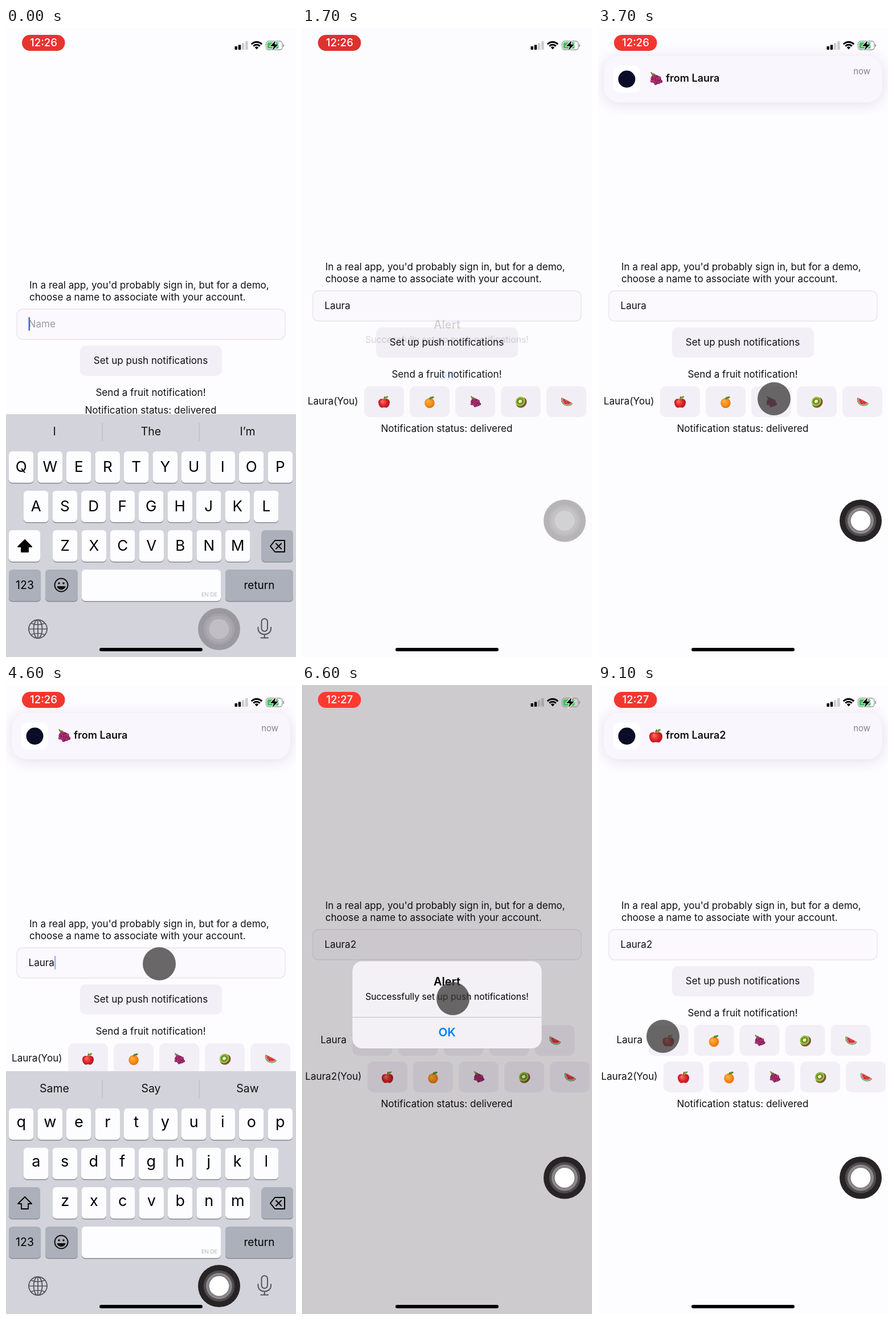
An HTML page with a canvas that plays this animation: 509 px wide and 1101 px high, repeating every 9200 ms.

```html
<!DOCTYPE html>
<html lang="en">
<head>
<meta charset="utf-8">
<title>Push notification demo</title>
<style>
html, body { margin: 0; width: 100%; height: 100%; overflow: hidden; background: #fdfcff; }
canvas { display: block; width: 509px; height: 1101px; }
</style>
</head>
<body>
<canvas id="stage"></canvas>
<script>
const W = 509, H = 1101, LOOP = 9200;
const USER = 'Laura';
const FRUITS = [apple, orange, grapes, kiwi, melon];
const canvas = document.getElementById('stage');
const dpr = window.devicePixelRatio || 1;
canvas.width = Math.round(W * dpr);
canvas.height = Math.round(H * dpr);
const c = canvas.getContext('2d');

const clamp = v => Math.max(0, Math.min(1, v));
const lin = (t, a, b) => clamp((t - a) / (b - a));
const ramp = (t, a, b) => { const k = lin(t, a, b); return k * k * (3 - 2 * k); };
const mix = (a, b, k) => a + (b - a) * k;

function box(x, y, w, h, r, fill, stroke, lw = 1) {
  c.beginPath();
  c.roundRect(x, y, w, h, r);
  if (fill) { c.fillStyle = fill; c.fill(); }
  if (stroke) { c.strokeStyle = stroke; c.lineWidth = lw; c.stroke(); }
}
function disc(x, y, r, fill) {
  c.beginPath();
  c.arc(x, y, r, 0, 7);
  c.fillStyle = fill;
  c.fill();
}
function oval(x, y, rx, ry, rot, fill) {
  c.beginPath();
  c.ellipse(x, y, rx, ry, rot, 0, 7);
  c.fillStyle = fill;
  c.fill();
}
function poly(pts, fill, stroke, lw = 2) {
  c.beginPath();
  pts.forEach(([x, y], i) => i ? c.lineTo(x, y) : c.moveTo(x, y));
  c.closePath();
  c.lineJoin = 'round';
  if (stroke) { c.strokeStyle = stroke; c.lineWidth = lw; c.stroke(); }
  if (fill) { c.fillStyle = fill; c.fill(); }
}
function path(d, stroke, lw) {
  c.strokeStyle = stroke;
  c.lineWidth = lw;
  c.lineCap = c.lineJoin = 'round';
  c.stroke(new Path2D(d));
}
function text(s, x, y, size = 17.1, color = '#111013', align = 'left', weight = 400) {
  c.font = `${weight} ${size}px Inter, "Liberation Sans", sans-serif`;
  c.textAlign = align;
  c.textBaseline = 'middle';
  c.fillStyle = color;
  c.fillText(s, x, y);
}
function at(x, y, s, draw) {
  c.save();
  c.translate(x, y);
  c.scale(s, s);
  draw();
  c.restore();
}

// Fruits fit a 20 px square around the origin
function apple() {
  const g = c.createRadialGradient(-3, -1, 1, 0, 2, 11);
  g.addColorStop(0, '#ff6a58');
  g.addColorStop(0.5, '#e0252a');
  g.addColorStop(1, '#a80f1c');
  c.fillStyle = g;
  c.fill(new Path2D('M0-4C3-7 10-6 10 1C10 6 6 11 3 10Q0 9-3 10C-6 11-10 6-10 1C-10-6-3-7 0-4Z'));
  path('M0-4Q0-7 1-9', '#6b3a1e', 1.4);
  oval(4, -8, 3.6, 1.6, -0.5, '#5da130');
}
function orange() {
  const g = c.createRadialGradient(-3, -1, 1, 0, 2, 10);
  g.addColorStop(0, '#ffb03a');
  g.addColorStop(0.6, '#f98a15');
  g.addColorStop(1, '#d9650a');
  disc(0, 2, 8.7, g);
  path('M0-5L1-8', '#5b6b20', 1.5);
  oval(4, -7.5, 4, 1.8, -0.3, '#4d9130');
}
function grapes() {
  path('M-4-5L-7-9.500', '#6c7a2c', 1.8);
  oval(-4, -7, 3.4, 1.6, 0.3, '#6d9b3a');
  oval(0.5, 1, 8.5, 6.5, 0.5, '#7d1b54');
  for (let i = 0; i < 15; i++) {
    // golden-angle spiral fills the tilted bunch
    const a = i * 2.4, r = Math.sqrt(i / 15) * 8.4;
    const u = r * Math.cos(a), v = r * Math.sin(a) * 0.8;
    const x = 0.6 + u * 0.86 - v * 0.5, y = 1.2 + u * 0.5 + v * 0.86;
    disc(x, y, 2.3, i % 2 ? '#8a1f5c' : '#a52b6c');
    disc(x - 0.6, y - 0.7, 0.7, '#c9658f');
  }
}
function kiwi() {
  oval(1, 1, 10, 8.8, -0.7, '#7b5a2c');
  oval(-1, -1, 8.8, 7.8, -0.7, '#bfd46a');
  oval(-1, -1, 7.8, 6.8, -0.7, '#86b32e');
  oval(-1, -1, 3.2, 2.5, -0.7, '#eef0bd');
  for (let i = 0; i < 12; i++) {
    const a = i * Math.PI / 6;
    disc(-1 + 4.5 * Math.cos(a), -1 + 4 * Math.sin(a), 0.65, '#28321a');
  }
}
function melon() {
  c.rotate(0.48);
  for (const [r, fill] of [[11, '#3f8f3d'], [9.6, '#e5efc0'], [8.7, '#ea4650']]) {
    c.beginPath();
    c.ellipse(0, -3, r, r * 0.86, 0, 0, Math.PI);
    c.fillStyle = fill;
    c.fill();
  }
  for (const [x, y] of [[-4.5, -1], [-1.5, 1], [1.8, 0], [4.6, -1], [0, 3]]) oval(x, y, 0.6, 0.9, 0, '#3a1518');
}

function fruitRow(label, x, y) {
  text(label, x - 10.5, y + 27, 17.1, '#111013', 'right');
  FRUITS.forEach((fruit, i) => {
    box(x + i * 80, y, 70, 54, 10, '#f3eff7');
    at(x + i * 80 + 35, y + 27.5, 1, fruit);
  });
}

function drawForm(t, rows, name, focused) {
  const y = 32 * (1 - rows);
  text("In a real app, you'd probably sign in, but for a demo,", 41, 419 + y);
  text('choose a name to associate with your account.', 41, 440 + y);
  box(19, 460 + y, 471, 53, 10.5, '#fbf8fe', '#e9e4ee', 1.3);
  text(name || 'Name', 39.5, 487 + y, 17.1, name ? '#111013' : '#9b98a0');
  if (focused) {
    const x = 39.5 + (name ? c.measureText(name).width : 0);
    c.globalAlpha = 0.5 + 0.5 * Math.cos(t / 1082 * Math.PI * 2);
    box(x, 474 + y, 2.5, 24, 1, '#3f66ee');
    c.globalAlpha = 1;
  }
  box(130, 524 + y, 249, 53, 10, '#f3eff7');
  text('Set up push notifications', 254, 550.5 + y, 17.1, '#111013', 'center');
  text('Send a fruit notification!', 254, 607 + y, 17.1, '#111013', 'center');
  if (rows === 1) fruitRow(USER + '(You)', 109, 627);
  if (rows === 2) {
    fruitRow(USER, 88.5, 595);
    fruitRow(USER + '2(You)', 115, 659);
  }
  text('Notification status: delivered', 254, 670 + 32 * rows, 17.1, '#111013', 'center');
}

function key(x, y, w, label, size = 19.5, gray = false, dy = 0) {
  box(x, y + 1.5, w, 55, 6, '#898a90');
  box(x, y, w, 55, 6, gray ? '#abb0ba' : '#fdfcff');
  if (label) text(label, x + w / 2, y + 28 + dy, size, '#000', 'center');
}

function drawKeyboard(upper) {
  c.fillStyle = '#d3d4db';
  c.fillRect(0, 676, W, 425);
  const words = upper ? ['I', 'The', 'I’m'] : ['Same', 'Say', 'Saw'];
  words.forEach((w, i) => text(w, 85 + i * 169.5, 707.5, 19.5, '#111', 'center'));
  c.fillStyle = '#b9bac2';
  c.fillRect(168.5, 691, 1.2, 32);
  c.fillRect(338.5, 691, 1.2, 32);
  [['qwertyuiop', 5, 741], ['asdfghjkl', 31, 810], ['zxcvbnm', 82, 879]].forEach(([chars, x, y]) => {
    [...chars].forEach((ch, i) =>
      key(x + i * 50.5, y, 43.5, upper ? ch.toUpperCase() : ch, upper ? 26 : 27, false, upper ? 0 : -3));
  });
  key(5, 879, 55, '', 0, !upper);
  const arrow = [[33, 896], [45, 908], [39, 908], [39, 917], [27, 917], [27, 908], [21, 908]];
  poly(arrow, upper ? '#000' : null, '#000', 1.8);
  key(448.5, 879, 55.5, '', 0, true);
  poly([[464, 907], [472, 897], [489, 897], [489, 917], [472, 917]], null, '#000', 2);
  path('M474 902.5l9 9M483 902.5l-9 9', '#000', 2);
  key(5, 948, 56, '123', 19.5, true);
  key(69, 948, 57, '', 0, true);
  path('M108.500 975a11.500 11.500 0 1 1-23 0a11.500 11.500 0 1 1 23 0', '#111', 2);
  disc(93, 972, 1.8, '#111');
  disc(101, 972, 1.8, '#111');
  c.fillStyle = '#111';
  c.fill(new Path2D('M89.500 977h15c-1 8-14 8-15 0z'));
  key(133, 948, 244, '');
  text('EN DE', 371, 992, 9.5, '#b4b4ba', 'right');
  key(385, 948, 119, 'return', 19, true);

  const ink = '#54555b';
  c.strokeStyle = ink;
  c.lineWidth = 1.8;
  for (const rx of [16, 7.5]) {
    c.beginPath();
    c.ellipse(56, 1052, rx, 16, 0, 0, 7);
    c.stroke();
  }
  path('M56 1036v32M40 1052h32M44 1042q12 5 24 0M44 1062q12-5 24 0', ink, 1.7);
  box(448.5, 1034, 10.5, 22, 5.2, null, ink, 2);
  path('M442.500 1049v2c0 14 22.500 14 22.500 0v-2M453.800 1061.500v6M447.500 1067.500h12.500', ink, 2);
}

function drawStatus(t) {
  const p = Math.sin((t - 50) / 900 * Math.PI * 2);
  box(28, 12, 75.5, 28, 14, `rgb(${236 + 18 * p},${54 + 4 * p},${47 + p})`);
  text(t < 5600 ? '12:26' : '12:27', 66, 26.5, 18.6, '#fff', 'center', 500);
  [6, 8.5, 11.5, 15].forEach((h, i) => box(401.5 + i * 6.2, 38 - h, 4.5, h, 1, i < 2 ? '#000' : 'rgba(60,55,65,.25)'));
  c.strokeStyle = '#000';
  c.lineCap = 'butt';
  c.lineWidth = 3;
  for (const r of [12.5, 7.8]) {
    c.beginPath();
    c.arc(440, 37, r, -Math.PI * 0.76, -Math.PI * 0.24);
    c.stroke();
  }
  c.beginPath();
  c.moveTo(440, 37.5);
  c.arc(440, 37, 4.4, -Math.PI * 0.76, -Math.PI * 0.24);
  c.fillStyle = '#000';
  c.fill();
  box(456.5, 23, 28.5, 15, 4.5, null, '#98969c', 1.3);
  box(486.3, 28, 1.8, 5, 1, '#98969c');
  box(458.5, 25, 20, 11, 2.6, '#3cc45a');
  poly([[473, 22], [463.5, 32], [470, 32], [467.5, 39.5], [478, 28.8], [471.5, 28.8]], '#000', '#fdfcff', 2.2);
}

function drawAlert(k, appearing) {
  if (k <= 0) return;
  c.fillStyle = `rgba(8,0,8,${0.195 * k * k})`;
  c.fillRect(0, 0, W, H);
  c.save();
  if (appearing) {
    const s = 1.15 - 0.15 * k;
    c.translate(254.5, 559.5);
    c.scale(s, s);
    c.translate(-254.5, -559.5);
  }
  // the panel thins out faster than its text
  c.globalAlpha = k * k;
  box(88.5, 483.5, 332, 152.500, 17, '#f4f1f6');
  c.fillStyle = '#c8c5c9';
  c.fillRect(88.5, 581, 332, 1.2);
  c.globalAlpha = k;
  text('Alert', 254.5, 520, 20, '#000', 'center', 600);
  text('Successfully set up push notifications!', 254.5, 546.5, 15.75, '#000', 'center');
  text('OK', 254.5, 609, 20.5, '#087bf7', 'center', 600);
  c.restore();
}

function drawBanner(k, fruit, from) {
  if (k <= 0) return;
  c.save();
  c.translate(0, -150 * (1 - k));
  c.shadowColor = 'rgba(100,70,140,.16)';
  c.shadowBlur = 22 * dpr;
  c.shadowOffsetY = 3 * dpr;
  box(10, 49, 489, 81, 26, '#f9f7fd');
  c.shadowColor = 'transparent';
  box(27, 66, 47, 47, 10, '#fff');
  disc(50.5, 89.5, 15, '#0b0c26');
  at(101.5, 89, 1.15, fruit);
  text('from ' + from, 119, 89, 18, '#111013', 'left', 600);
  text('now', 478, 76, 15, '#85828a', 'right');
  c.restore();
}

function drawBall(x, y, k) {
  disc(x, y, 37, `rgba(40,36,38,${mix(0.33, 1, k)})`);
  disc(x, y, 27.3, `rgba(255,255,255,${mix(0.1, 0.18, k)})`);
  disc(x, y, 23, `rgba(245,242,255,${mix(0.1, 0.36, k)})`);
  if (k) disc(x, y, 18.4, `rgba(60,58,64,${0.5 * k})`);
  disc(x, y, 17.5, `rgba(255,255,255,${mix(0.24, 1, k)})`);
}

// time, x, y
const TRACK = [
  [2150, 309, 649], [3750, 309, 649], [4000, 269, 488], [4700, 269, 488], [5150, 78, 769],
  [5500, 78, 769], [6000, 265, 549], [6700, 265, 549], [7000, 255, 609], [7350, 255, 609],
  [7800, 120, 615], [8250, 120, 615], [9100, 114, 615]
];
function drawTouch(t, k) {
  if (!k) return;
  let i = 0;
  while (i < TRACK.length - 2 && t >= TRACK[i + 1][0]) i++;
  const [a, ax, ay] = TRACK[i], [b, bx, by] = TRACK[i + 1];
  const p = ramp(t, a, b);
  disc(mix(ax, bx, p), mix(ay, by, p), 29, `rgba(60,58,56,${0.755 * k})`);
}

function draw(t) {
  c.setTransform(dpr, 0, 0, dpr, 0, 0);
  c.fillStyle = '#fdfcff';
  c.fillRect(0, 0, W, H);

  const rows = t < 1250 ? 0 : t < 6400 ? 1 : 2;
  const typed = t < 200 ? 0 : Math.floor((t - 200) / 120) + 1;
  const name = USER.slice(0, typed) + (t >= 5400 ? '2' : '');
  const focused = t < 950 || (t >= 4050 && t < 6150);
  const keys = 1 - ramp(t, 950, 1150) + ramp(t, 4050, 4250) - ramp(t, 6150, 6350);
  const active = ramp(t, 2150, 2300);

  drawForm(t, rows, name, focused);
  if (keys > 0) {
    c.save();
    c.translate(0, 425 * (1 - keys));
    drawKeyboard(!typed);
    c.restore();
  }
  const alertUp = t < 4000
    ? ramp(t, 1250, 1350) - lin(t, 1600, 1720)
    : ramp(t, 6400, 6500) - lin(t, 7150, 7270);
  drawAlert(alertUp, t < 1500 || (t > 6000 && t < 7000));
  drawStatus(t);
  if (t < 6000) drawBanner(ramp(t, 2750, 2950) - ramp(t, 5000, 5200), grapes, USER);
  else drawBanner(ramp(t, 8600, 8800), apple, USER + '2');
  drawBall(mix(461, 374, keys), mix(862.5, 1052, keys), active);
  drawTouch(t, active);
  box(164, 1085, 181, 6, 3, '#000');
}

const start = performance.now();
function tick() {
  draw((performance.now() - start) % LOOP);
  requestAnimationFrame(tick);
}
tick();
</script>
</body>
</html>
```
